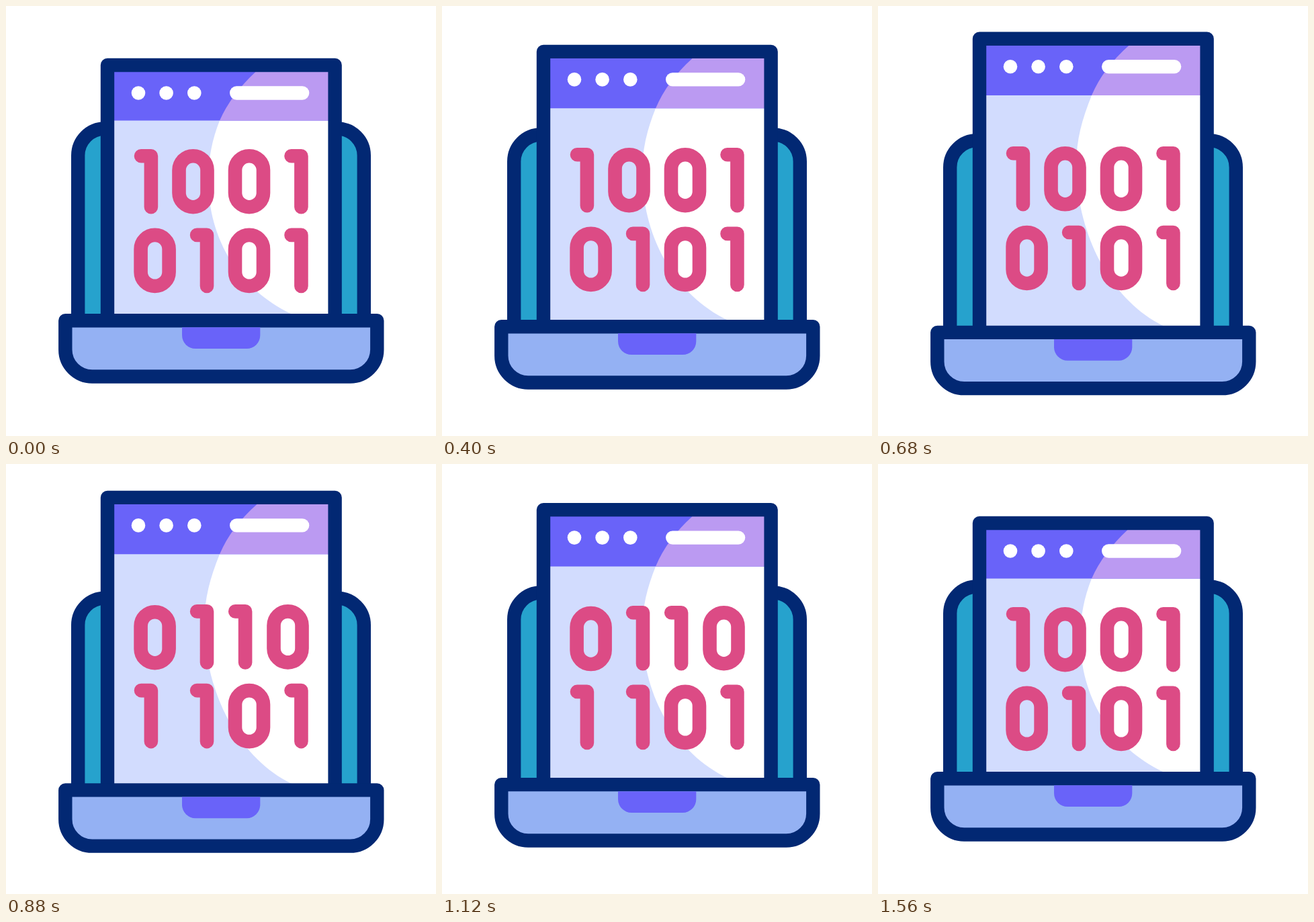
An HTML page for the animation above (2 s loop, 640 by 640 pixels).

```html
<!DOCTYPE html>
<html lang="en">
<head>
<meta charset="utf-8">
<title>Binary laptop</title>
<style>
  html, body { margin: 0; width: 100%; height: 100%; overflow: hidden; background: #fff; }
  svg { display: block; width: 100vw; height: 100vh; }
  .line { stroke: #022873; stroke-width: 20.4; stroke-linejoin: round; }
  .digits { fill: none; stroke: #dc4b85; stroke-width: 20.6; stroke-linecap: round; stroke-linejoin: round; }
</style>
</head>
<body>
<svg viewBox="0 0 640 640">
  <rect id="lid" class="line" x="107.2" y="182.5" width="425.6" height="330" rx="40" fill="#26a2cd"/>
  <path id="page" fill="#d2dcfe"/>
  <path id="glow" fill="#fff"/>
  <path id="header" fill="#6963f9"/>
  <path id="tint" fill="#bb9af2"/>
  <g id="controls" fill="#fff">
    <circle cx="197" cy="129.5" r="10.3"/>
    <circle cx="238.6" cy="129.5" r="10.3"/>
    <circle cx="280.3" cy="129.5" r="10.3"/>
    <rect x="333" y="119.3" width="118.3" height="20.4" rx="10.2"/>
  </g>
  <path id="frame" class="line" fill="none"/>
  <path id="digits" class="digits"/>
  <g id="base">
    <path class="line" fill="#94b1f3" d="M88.3 468.2H552.3V511.5A40 40 0 0 1 512.3 551.5H128.3A40 40 0 0 1 88.3 511.5Z"/>
    <path fill="#6963f9" d="M262 478.3H378.3V490A20 20 0 0 1 358.3 510H282A20 20 0 0 1 262 490Z"/>
  </g>
</svg>
<script>
(() => {
  const LOOP = 2000, START = 40, PEAK = 760, END = 1480;
  const SWAP = 780, RESET = 1560;
  const LEFT = 151, RIGHT = 489.6;
  const ROW1 = 223.2, ROW2 = 340.9;

  const el = Object.fromEntries(
    [...document.querySelectorAll('[id]')].map(node => [node.id, node]));
  const mix = (a, b, u) => a + (b - a) * u;
  const shift = (node, y) => node.setAttribute('transform', `translate(0 ${y})`);
  const draw = (node, d) => node.setAttribute('d', d);
  const box = (y0, y1) => `M${LEFT} ${y0}H${RIGHT}V${y1}H${LEFT}Z`;

  // cubic-bezier(.48, 0, .52, 1), solved by bisection
  function ease(x) {
    if (x <= 0) return 0;
    if (x >= 1) return 1;
    let lo = 0, hi = 1, s = 0;
    for (let i = 0; i < 24; i++) {
      s = (lo + hi) / 2;
      const r = 1 - s;
      if (1.44 * s * r * r + 1.56 * s * s * r + s * s * s < x) lo = s;
      else hi = s;
    }
    return s * s * (3 - 2 * s);
  }

  const one = (x, y) => `M${x + 10.3} ${y}h14.9v76`;
  const zero = (x, y) =>
    `M${x + 10.3} ${y + 21}a21 21 0 0 1 42 0v34a21 21 0 0 1 -42 0z`;

  const CODE_A =
    one(190.7, ROW1) + zero(247.2, ROW1) + zero(330.7, ROW1) + one(414.2, ROW1) +
    zero(190.3, ROW2) + one(273.8, ROW2) + zero(330.7, ROW2) + one(414.2, ROW2);
  const CODE_B =
    zero(190.3, ROW1 + 0.8) + one(273.8, ROW1) + one(330.9, ROW1) + zero(388.2, ROW1) +
    one(190.7, ROW2) + one(273.8, ROW2) + zero(330.7, ROW2) + one(414.2, ROW2);

  function render(t) {
    const u = t < PEAK
      ? ease((t - START) / (PEAK - START))
      : 1 - ease((t - PEAK) / (END - PEAK));
    const rise = 40 * u, sink = 18 * u;
    const roof = 88 - rise, floor = 468 + sink;
    const split = 170.5 - rise + Math.min(1.8, rise * 0.3);

    shift(el.lid, sink);
    shift(el.base, sink);
    shift(el.controls, -rise);
    shift(el.digits, -4 * u);
    draw(el.digits, t >= SWAP && t < RESET ? CODE_B : CODE_A);
    draw(el.page, box(roof, floor));
    draw(el.header, box(roof, split));
    draw(el.frame, box(roof, floor + 20));

    // light disc: an arc in the header, a stretching curve in the page
    const hx = 318, lx = mix(301, 295, u), ly = mix(258, 236, u);
    const ex = 424, ey = 458 + sink;
    const a = mix(28, 36, u), k = mix(90, 103, u);
    draw(el.tint, `M${371.5 + 2 * u} ${roof + 10}Q335 ${roof + 44} ${hx} ${split}` +
      `H${RIGHT}V${roof + 10}Z`);
    draw(el.glow, `M${hx} ${split}` +
      `C${hx - a * 0.4} ${split + a} ${lx} ${ly - a - 2} ${lx} ${ly}` +
      `C${lx} ${ly + k} ${ex - 77} ${ey - 37} ${ex} ${ey}` +
      `L${ex + 24} ${ey + 10}H${RIGHT}V${split}Z`);
  }

  const begin = performance.now();
  function tick() {
    render(Math.max(0, performance.now() - begin) % LOOP);
    requestAnimationFrame(tick);
  }
  render(0);
  requestAnimationFrame(tick);
})();
</script>
</body>
</html>
```
